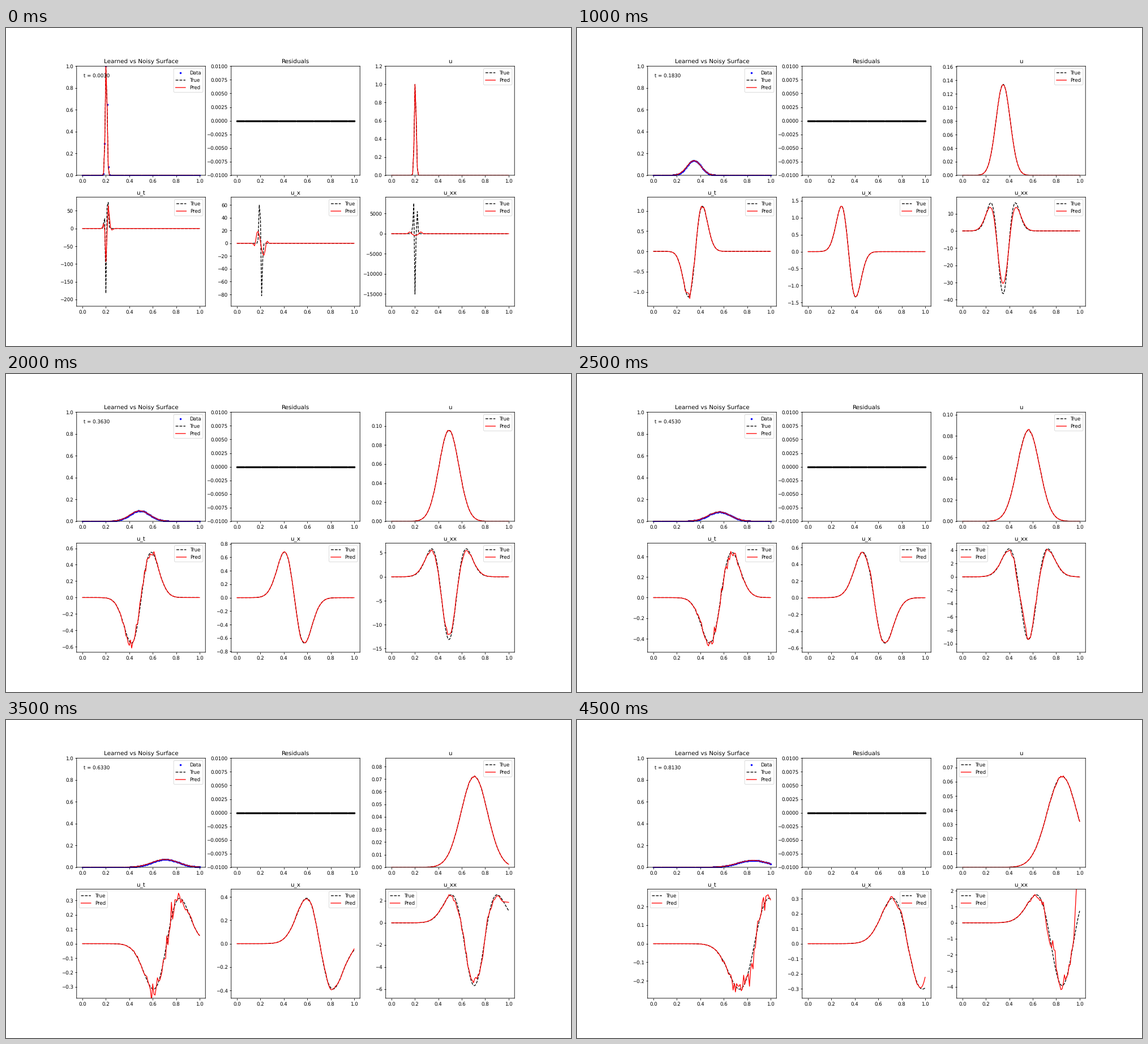
A matplotlib script that plays this animation: 998 by 561 pixels, repeating every 5 s.

```python
import math

import matplotlib.pyplot as plt
import numpy as np
from matplotlib.animation import FuncAnimation

DPI = 62.375
FRAMES, INTERVAL = 10, 500
D, C, X0 = 0.01, 0.8, 0.2          # diffusion, speed, start of the pulse
T0, DT, STEP = 0.003, 0.003, 0.09  # first time, sampling step, time per frame
H, WIN, DEG = 0.01, 11, 3          # grid spacing, smoothing window, degree
NOISE, EDGE_BEND = 0.0005, 100     # sample noise, misfit of the last window
SCALE = math.sqrt(T0) * math.exp((C * T0) ** 2 / (4 * D * T0))

x = np.arange(101) * H

plt.rcParams.update({
    "path.snap": False,
    "text.hinting": "none",
    "axes.linewidth": 1,
    "xtick.major.width": 1,
    "ytick.major.width": 1,
})


def pulse(t):
    d = x - X0 - C * t
    return SCALE / math.sqrt(t) * np.exp(-d ** 2 / (4 * D * t))


def exact(t):
    d, var = x - X0 - C * t, 2 * D * t
    u = pulse(t)
    ux = -d / var * u
    uxx = (d ** 2 / var ** 2 - 1 / var) * u
    return {"u": u, "u_t": D * uxx - C * ux, "u_x": ux, "u_xx": uxx}


def weights(pos, order, step):
    """Derivative weights of a local cubic fit, taken at window place pos."""
    powers = np.vander(np.arange(WIN) - pos, DEG + 1, increasing=True)
    return np.linalg.pinv(powers)[order] * math.factorial(order) / step ** order


def space_diff(u, order):
    out = np.empty_like(u)
    for i in range(len(u)):
        a = min(max(i - WIN // 2, 0), len(u) - WIN)
        out[i] = weights(i - a, order, H) @ u[a:a + WIN]
    return out


def time_diff(k, t, noise):
    pos = 0 if k == 0 else WIN // 2
    w = weights(pos, 1, DT)
    rows = np.array([pulse(t + (j - pos) * DT) for j in range(WIN)])
    return w @ (rows + noise)


def estimate(k, t):
    """Derivatives fitted to noisy samples; noise grows with the signal."""
    rng = np.random.default_rng(40 + k)
    clean = pulse(t)
    level = 0 if k == 0 else NOISE * np.minimum(1, clean / 0.06)
    noise = level * rng.standard_normal((WIN, x.size))
    u = clean + noise[WIN // 2]
    # the one-sided fit bends upward once the pulse reaches the right end
    bend = EDGE_BEND * np.clip((clean[-1] - 0.002) / 0.01, 0, 1)
    over = np.maximum(x - 0.95, 0)
    return {"u": u,
            "u_t": time_diff(k, t, noise),
            "u_x": space_diff(u, 1) + bend * over ** 2 / 4,
            "u_xx": space_diff(u, 2) + bend * over}


def draw_pair(ax, true, pred):
    ax.plot(x, true, "k--", label="True")
    ax.plot(x, pred, "r", label="Pred")


def free_corner(curves, low, top):
    """Upper right, unless a curve runs through the legend's place there."""
    peak = max(c[x > 0.785].max() for c in curves)
    return "upper left" if peak > low + 0.83 * (top - low) else "upper right"


def draw(k):
    t = T0 + STEP * k
    true, pred = exact(t), estimate(k, t)
    for ax in axes.flat:
        ax.clear()

    surface, resid = axes[0, :2]
    surface.plot(x, pred["u"], "b.", label="Data")
    draw_pair(surface, true["u"], pred["u"])
    surface.set_ylim(0, 1)
    surface.text(0.01, 0.9, f"t = {t:.4f}")
    surface.set_title("Learned vs Noisy Surface")
    surface.legend(loc="upper right")

    resid.plot(x, np.zeros_like(x), "k.")
    resid.set_ylim(-0.01, 0.01)
    resid.set_title("Residuals")

    for ax, name in zip(axes.flat[2:], ("u", "u_t", "u_x", "u_xx")):
        draw_pair(ax, true[name], pred[name])
        low = 0 if name == "u" else 1.2 * true[name].min()
        top = 1.2 * true[name].max()
        ax.set_ylim(low, top)
        ax.set_title(name)
        ax.legend(loc=free_corner((true[name], pred[name]), low, top))

    for ax in axes.flat:
        ax.set_xlim(-0.05, 1.05)


fig, axes = plt.subplots(2, 3, figsize=(16, 561.001 / DPI), dpi=DPI)
fig.subplots_adjust(left=0.125, right=0.9, bottom=0.125, top=0.88,
                    wspace=0.2, hspace=0.2)
anim = FuncAnimation(fig, draw, frames=FRAMES, interval=INTERVAL,
                     init_func=lambda: None, repeat=True, repeat_delay=0)
plt.show()
```
